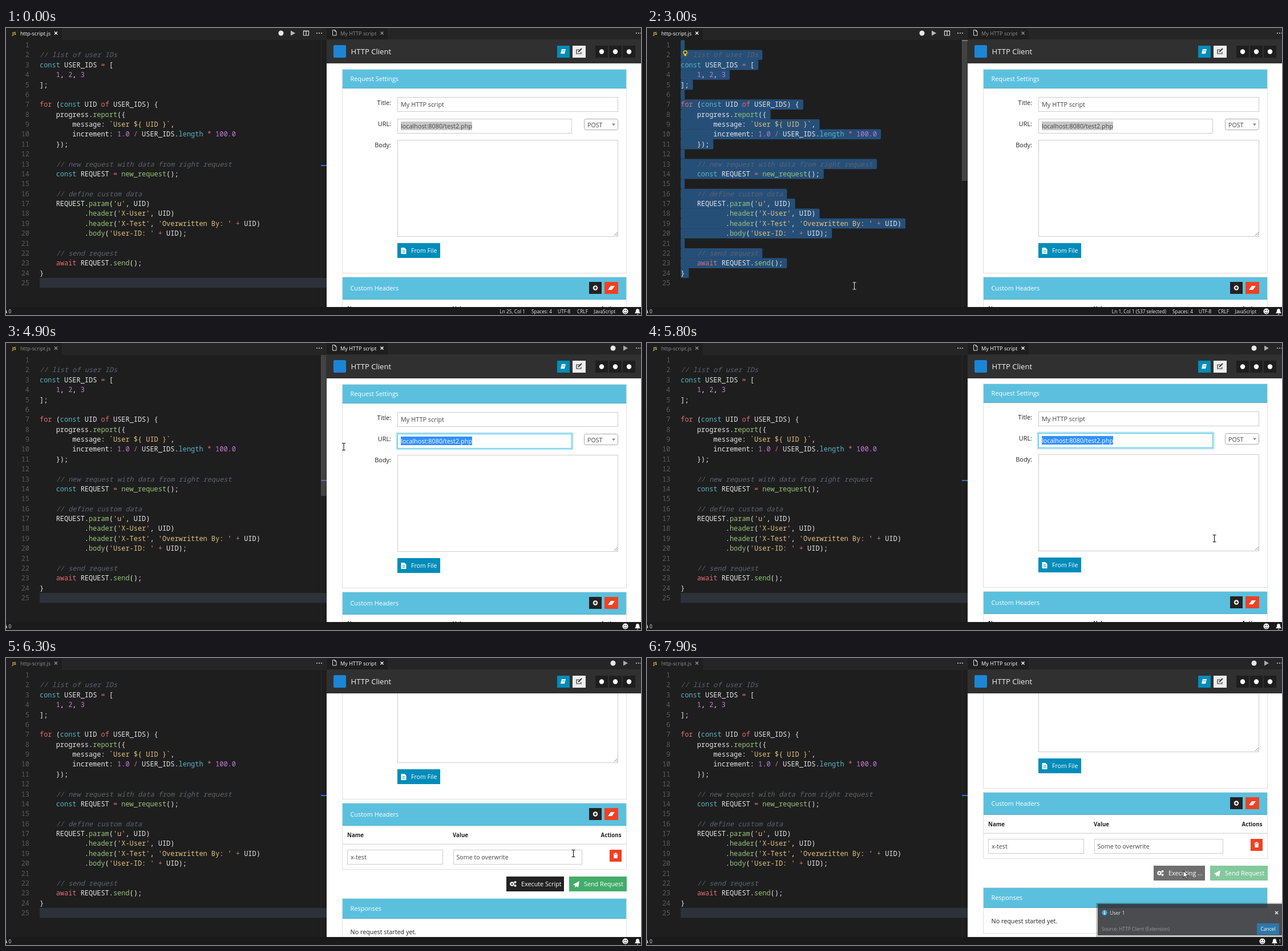
These frames come from a looping animation (1113x503 px, 8 s). An HTML page:

```html
<!DOCTYPE html>
<html lang="en">
<head>
<meta charset="utf-8">
<title>HTTP script editor</title>
<style>
html, body { margin: 0; width: 100%; height: 100%; overflow: hidden; background: #1e1e1e; }
svg { display: block; width: 1113px; height: 503px; font-family: "Open Sans", "Noto Sans", sans-serif; }
.code { font: 11.94px "Noto Sans Mono", monospace; white-space: pre; }
</style>
</head>
<body>
<svg id="stage" viewBox="0 0 1113 503"></svg>
<script type="text/plain" id="source">

// list of user IDs
const USER_IDS = [
    1, 2, 3
];

for (const UID of USER_IDS) {
    progress.report({
        message: `User ${ UID }`,
        increment: 1.0 / USER_IDS.length * 100.0
    });

    // new request with data from right request
    const REQUEST = new_request();

    // define custom data
    REQUEST.param('u', UID)
           .header('X-User', UID)
           .header('X-Test', 'Overwritten By: ' + UID)
           .body('User-ID: ' + UID);

    // send request
    await REQUEST.send();
}
</script>
<script>
const LOOP = 8000, STEP = 100;
const LEFT = 59, TOP = 21, CHAR = 7.164, LINE = 17.375;
const BLUE = '#008cba', SKY = '#5bc0de', DARK = '#222', RED = '#f04124';
const lines = document.getElementById('source').textContent.split('\n').slice(1, 26);
const stage = document.getElementById('stage');

// [time, x, y] of the mouse
const mousePath = [
  [500, 225, 498], [1000, 170, 447], [1200, 170, 447], [1300, 110, 395], [1400, 64, 326],
  [1700, 16, 120], [1900, 10, 28], [2050, 10, 28], [2900, 363.5, 452], [3350, 363.5, 452],
  [4000, 840, 180], [4200, 840, 173], [4500, 840, 173], [5000, 530, 184], [5400, 994.5, 342.5],
  [6350, 994.5, 342.5], [7200, 893, 375], [7300, 944, 375], [7600, 944, 375], [7700, 940, 373]
];
// [time, opacity] of the editor's scrollbar
const barFade = [
  [500, 0], [600, 1], [3500, 1], [4300, 0], [4600, 0], [4800, 1], [5000, 1], [5800, 0]
];

const clamp = (v, lo, hi) => Math.max(lo, Math.min(hi, v));

function at(keys, t) {
  const i = keys.findIndex(k => k[0] > t);
  if (i === 0) return keys[0].slice(1);
  if (i < 0) return keys[keys.length - 1].slice(1);
  const a = keys[i - 1], b = keys[i], p = (t - a[0]) / (b[0] - a[0]);
  return a.slice(1).map((v, j) => v + (b[j + 1] - v) * p);
}

function scrollAt(t) {
  const p = clamp((t - 5698) / 847, 0, 1);
  return Math.round(201 * (p < .5 ? 4 * p ** 3 : 1 - 4 * (1 - p) ** 3));
}

const rect = (x, y, w, h, fill, more = '') =>
  `<rect x="${x}" y="${y}" width="${w}" height="${h}" fill="${fill}" ${more}/>`;
const frame = (x, y, w, h, stroke = '#ccc', more = '') =>
  rect(x + .5, y + .5, w - 1, h - 1, '#fff', `stroke="${stroke}" ${more}`);
const text = (x, y, s, size, fill, more = '') =>
  `<text x="${x}" y="${y}" font-size="${size}" fill="${fill}" ${more}>${s}</text>`;
const path = (d, fill = 'none', stroke = 'none', width = 1) =>
  `<path d="${d}" fill="${fill}" stroke="${stroke}" stroke-width="${width}"/>`;
const dot = (x, y, r, fill) => `<circle cx="${x}" cy="${y}" r="${r}" fill="${fill}"/>`;
const group = (s, attrs) => `<g ${attrs}>${s}</g>`;
const cross = (x, y, c) => path(`M${x - 2.5} ${y - 2.5}l5 5m0-5l-5 5`, 'none', c, 1.4);
const dots = (x, y, c) => [-4, 0, 4].map(d => dot(x + d, y, 1, c)).join('');
const END = 'text-anchor="end"', BOLD = 'font-weight="700"';

function paint(line) {
  const token = /(\/\/.*)|(`.*?`|'.*?')|\b(const|length)\b|(\b(?:for|of|await)\b|[=*+\/])|(\d[\d.]*)|(\w+(?=\())/g;
  const colors = ['#5c6370', '#e5c07b', '#56b6c2', '#e06c75', '#c678dd', '#98c379'];
  return line.replace(token, (s, ...groups) => {
    const kind = groups.slice(0, 6).findIndex(Boolean);
    return `<tspan fill="${colors[kind]}"${kind ? '' : ' font-style="italic"'}>${s}</tspan>`;
  });
}

const codeText = lines.map((s, i) => {
  const y = TOP + i * LINE + 13;
  return `<text class="code" x="41" y="${y}" fill="#5a5a5a" ${END}>${i + 1}</text>` +
    `<text class="code" x="${LEFT}" y="${y}" fill="#e6e6e6">${paint(s)}</text>`;
}).join('');

// Caret position and number of selected characters (line ends count as two)
function selection(t) {
  if (t < 1200 || t >= 3200) return { row: 24, col: 0, count: 0 };
  const [x, y] = at(mousePath, Math.min(t - STEP, 2000));
  const row = clamp(Math.floor((y - TOP) / LINE), 0, 24);
  const col = clamp(Math.round((x - LEFT) / CHAR), 0, lines[row].length);
  const count = lines.slice(row, 24).reduce((n, s) => n + s.length + 2, -col);
  return { row, col, count: row < 24 ? count : 0 };
}

function editor(t, sel) {
  let out = rect(0, 20, 562, 469, '#1e1e1e') + rect(552, TOP, 1, 468, '#2b2b2b');
  if (!sel.count) out += rect(LEFT, TOP + 24 * LINE, 503, LINE, '#2c313a');
  for (let i = sel.row; i < 24; i++) {
    const from = i === sel.row ? sel.col : 0;
    out += rect(LEFT + from * CHAR, TOP + i * LINE, (lines[i].length + 1 - from) * CHAR, LINE + .3, '#264f78', 'rx="2"');
  }
  out += codeText;
  if (t >= 1200 && t < 2100) {
    out += rect(LEFT + sel.col * CHAR - .5, TOP + sel.row * LINE, 1.5, LINE, '#d0d0d0');
  }
  if (t >= 3000 && t < 3200) {
    out += '<circle cx="67" cy="43" r="3" fill="#3a4a3c" stroke="#fc0" stroke-width="1.3"/>' + rect(65.5, 46, 3, 3, '#fc0');
  }
  const [fade] = at(barFade, t);
  return out + rect(552, TOP + sel.row * 9.125, 10, 2, sel.count ? '#777' : '#3f6fc4') +
    rect(552, TOP, 9.5, 247, '#797979', `opacity="${.4 * fade}"`);
}

const runIcon = (x, c) => path(`M${x - 4} 4.5l8 4.5l-8 4.5z`, c);

function tabs(web) {
  const on = '#fff', off = '#8f8f8f', left = web ? off : on, right = web ? on : off;
  const out = rect(0, 0, 1113, 21, '#252526') + rect(0, 0, 98, 21, '#1e1e1e') + rect(562, 0, 107, 21, '#1e1e1e') +
    text(11, 12, 'JS', 7.5, '#e8d44d', BOLD) + text(25, 12.5, 'http-script.js', 9.1, left) + cross(87.5, 9, left) +
    path('M572.5 3.5h4l2.5 2.5v7h-6.5zM576.5 3.5v2.5h2.5', 'none', '#ddd') +
    text(586, 12.5, 'My HTTP script', 9.1, right) + cross(659, 9, right) +
    dots(549, 9, '#ddd') + dots(1109, 9, '#ddd');
  if (web) return out + dot(1064, 9, 4.5, '#e8e8e8') + runIcon(1086, '#aaa');
  return out + dot(482, 9, 4.5, '#e8e8e8') + runIcon(503, '#bbb') +
    path('M521.5 5h9v8h-9zM526 5v8M521.5 5.5h9', 'none', '#ddd', 1.2);
}

function clientHeader() {
  const out = rect(562, 20, 551, 42, '#303030') + rect(574, 30, 22, 22, '#1c85d6', 'rx="2"') +
    text(604.5, 46, 'HTTP Client', 13.1, '#f2f2f2') +
    rect(966, 31, 22, 21, BLUE) + path('M974 37h7l-2 8h-7z', '#fff') + path('M974.5 40h5', 'none', BLUE) +
    rect(993, 31, 23, 21, '#eee') + path('M1005 38h-5v7h8v-3', 'none', '#333', 1.2) + path('M1003 42l6-6', 'none', '#333', 2);
  return out + [1033, 1057, 1081].map(x => rect(x, 31, 22, 21, '#1e1e1e') + dot(x + 11, 41.5, 4.2, '#fff')).join('');
}

const panel = (y, h, head, title) => frame(589, y, 499, h, '#dfdfdf') +
  rect(590, y + 1, 497, head - 1, SKY) + rect(590, y + head - 1, 497, 1, '#50a8c2') +
  text(603.5, y + head / 2 + 4, title, 10.9, '#fff');

function urlField(t, web) {
  const [mx] = at(mousePath, t);
  const from = !web ? 692 : t < 4600 ? 817 : t < 5100 ? clamp(mx, 692, 817) : 692;
  return (web ? rect(683.5, 156.5, 311, 31, '#bfe2ee', 'rx="2"') : '') +
    frame(686, 159, 306, 26, web ? '#3bceff' : '#ccc') +
    rect(from, 164, 817 - from, 15, web ? '#3390ff' : '#c8c8c8') +
    text(692, 176, 'localhost:8080/test2.php', 10.85, web && from === 692 ? '#fff' : '#444');
}

function buttons(busy) {
  const x = busy ? 888 : 877;
  const exec = rect(x, 565, 978 - x, 26, DARK) +
    `<circle cx="${x + 10}" cy="578" r="2.6" fill="none" stroke="#fff" stroke-width="2.2"/>` +
    dot(x + 15.5, 575, 2, '#fff') + dot(x + 15.5, 581, 2, '#fff') +
    text(x + 26, 582, busy ? 'Executing ...' : 'Execute Script', 10.8, '#fff');
  const send = rect(987, 565, 101, 26, '#43ac6a') + path('M994 579l11-6-2 11-3.5-2-2 2.5v-3.5z', '#fff') +
    text(1013, 582, 'Send Request', 10.8, '#fff');
  return group(exec + send, `opacity="${busy ? .65 : 1}"`);
}

function page(t, web) {
  const ink = '#222', soft = '#444';
  return panel(72, 358, 34, 'Request Settings') +
    [['Title:', 135], ['URL:', 172], ['Body:', 208.5]].map(([s, y]) => text(675, y, s, 10.9, ink, END)).join('') +
    frame(686, 121, 387, 26) + text(692, 138, 'My HTTP script', 10.9, soft) +
    urlField(t, web) +
    frame(1013, 159, 60, 20, '#aaa', 'rx="3"') + text(1019, 173.5, 'POST', 10.6, soft) + path('M1062 167.5h6l-3 4z', '#888') +
    frame(686, 196, 387, 170) + path('M1066 364l6-6M1069.5 364l2.5-2.5', 'none', '#888') +
    rect(686, 377, 75, 26, BLUE) + path('M692.5 385h6l3 3v8h-9z', '#fff') +
    path('M694.5 390h5M694.5 393h5', 'none', BLUE) + text(710, 394, 'From File', 10.6, '#fff') +
    panel(436, 117, 40, 'Custom Headers') +
    rect(1022, 445, 22, 21, DARK) + dot(1033, 455.5, 4.2, '#fff') + path('M1030.5 455.5h5m-2.5-2.5v5', 'none', DARK, 1.4) +
    rect(1049, 445, 24, 21, RED) + path('M1060 452h7l-5 7h-7z', '#fff') +
    text(598, 496, 'Name', 9.7, DARK, BOLD) + text(783, 496, 'Value', 9.7, DARK, BOLD) +
    text(1078.5, 496, 'Actions', 9.7, DARK, `${BOLD} ${END}`) +
    rect(590, 507.5, 497, 1.5, '#ddd') +
    frame(598, 518, 168, 26) + text(604, 535, 'x-test', 10.7, soft) +
    frame(784, 518, 226, 26) + text(789.5, 535, 'Some to overwrite', 10.7, soft) +
    rect(1058, 518, 21, 21, RED) + path('M1064.5 525h8v1.3h-8zM1067 523.5h3v1.5h-3zM1065 527h7l-.5 6h-6z', '#fff') +
    buttons(t >= 7700) +
    panel(603, 81, 36, 'Responses') + text(603.5, 665.5, 'No request started yet.', 10.8, ink);
}

function status(t, web, sel) {
  const shift = t >= 7800 ? 7 : 0, c = '#eee', size = 8.3;
  let out = rect(0, 489, 1113, 14, '#1a1a1a') + path('M0 493l2 6.5h-2z', c) + text(4.5, 500, '0', size, c);
  if (!web) {
    const count = sel.count ? ` (${sel.count} selected)` : '';
    out += text(910, 500, `Ln ${sel.row + 1}, Col ${sel.col + 1}${count}`, size, c, END) +
      [[921, 'Spaces: 4'], [967, 'UTF-8'], [1001, 'CRLF'], [1030.5, 'JavaScript']].map(([x, s]) => text(x, 500, s, size, c)).join('');
  }
  const face = dot(1085.5, 496.5, 5, '#fff') + dot(1083.7, 495, .9, '#1a1a1a') + dot(1087.3, 495, .9, '#1a1a1a') +
    path('M1082.5 497.5q3 4 6 0', 'none', '#1a1a1a');
  const bell = path('M1102 500q2-1.5 2-4.5q0-3.5 3-3.5t3 3.5q0 3 2 4.5zM1105.5 501h3l-1.5 1.5z', '#fff');
  return out + group(face + bell, `transform="translate(${-shift})"`) + (shift ? text(1107, 500, '1', size, c) : '');
}

const notice = rect(787, 429, 326, 60, '#000', 'opacity=".25"') + rect(790, 431, 323, 55, '#2f3135') +
  dot(802, 446.5, 4.7, '#1b9be0') + rect(801.3, 445.5, 1.4, 4, '#fff') + rect(801.3, 443, 1.4, 1.4, '#fff') +
  text(811, 450, 'User 1', 8.8, '#ddd') + cross(1103.5, 446.5, '#eee') +
  text(797, 478, 'Source: HTTP Client (Extension)', 8.2, '#8b8b8b') +
  rect(1069, 465, 39, 20, '#0e639c') + text(1088.5, 478, 'Cancel', 8.4, '#fff', 'text-anchor="middle"');

function pointer(t) {
  if (t < 500) return '';
  const [x, y] = at(mousePath, t);
  const beam = path('M-3-6h2.5l.5.5l.5-.5h2.5M0-6v12M-3 6h2.5l.5-.5l.5.5h2.5', 'none', x < 562 ? '#ddd' : '#111', 1.1);
  const arrow = path('M0 0v12l3-2.7 2 4.5 2-1-2-4.2h4z', '#fff', '#000', .8);
  const hand = path('M0 0q2-1 2.2 1v4l6 1.5q1.5.5 1 3l-1.2 5h-7l-4.5-6q0-1.8 3.3.5z', '#fff', '#000', .8);
  const shape = t < 6400 ? beam : t >= 7200 && t < 7700 ? hand : arrow;
  return group(shape, `transform="translate(${x} ${y})"`);
}

function draw(t) {
  const web = t >= 4200, sel = selection(t);
  stage.innerHTML = '<clipPath id="view"><rect x="562" y="62" width="551" height="427"/></clipPath>' +
    editor(t, sel) + tabs(web) + rect(562, 62, 551, 427, '#fff') +
    group(group(page(t, web), `transform="translate(0 ${-scrollAt(t)})"`), 'clip-path="url(#view)"') +
    clientHeader() + status(t, web, sel) +
    group(notice, `opacity="${clamp((t - 7770) / 150, 0, 1)}"`) + pointer(t);
}

const start = performance.now();
let shown = -1;
function tick() {
  const t = Math.floor((performance.now() - start) % LOOP / STEP) * STEP;
  if (t !== shown) draw(shown = t);
  requestAnimationFrame(tick);
}
tick();
</script>
</body>
</html>
```
